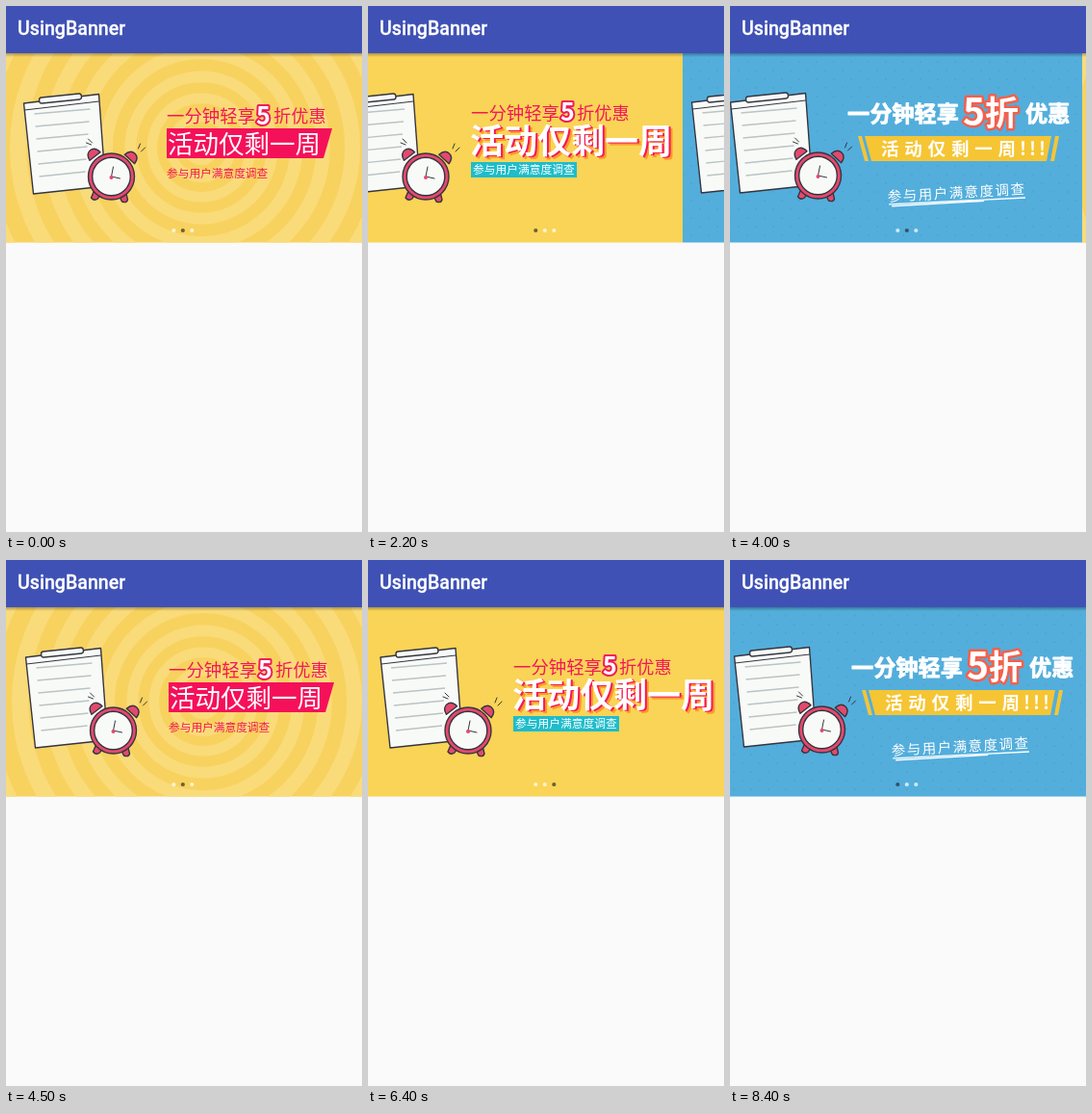
These frames come from a looping animation (370 by 546 pixels, 9.1 s). An HTML page:

```html
<!DOCTYPE html>
<html lang="zh-CN">
<head>
<meta charset="utf-8">
<title>UsingBanner</title>
<style>
  html, body { margin: 0; width: 100%; height: 100%; overflow: hidden; background: #fafafa; }
  svg { display: block; }
  text { font-family: "Noto Sans CJK SC", "Noto Sans CJK", sans-serif; }
  .title { font: 500 19.6px Roboto, sans-serif; fill: #fff; stroke: #fff; stroke-width: .3px; }
  .pink { fill: #f2185a; }
  .white { fill: #fff; }
  .light { font-weight: 300; }
  .medium { font-weight: 500; }
  .bold { font-weight: 700; }
  .black { font-weight: 900; }
  .heavy { stroke: #fff; stroke-width: .8px; stroke-linejoin: round; }
  .outlined { fill: #fff; paint-order: stroke; stroke-linejoin: round; }
  .five { font-weight: 700; font-size: 25px; stroke: #f2185a; stroke-width: 4px; }
  .big { font-weight: 900; stroke: #f4604c; stroke-width: 5px; }
  .ink { stroke: #35353f; stroke-width: 1.4; stroke-linejoin: round; stroke-linecap: round; }
  .thin { fill: none; stroke-width: 1; }
  .red { fill: #e4496d; }
  .paper { fill: #f8faf8; }
</style>
</head>
<body>
<svg width="370" height="546" viewBox="0 0 370 546">
  <defs>
    <clipPath id="page"><rect x="-5" y="49" width="375" height="196.5"/></clipPath>
    <pattern id="specks" width="18" height="18" patternUnits="userSpaceOnUse">
      <circle cx="4" cy="4" r="1" fill="#4ba4d2"/>
      <circle cx="13" cy="13" r="1" fill="#4ba4d2"/>
    </pattern>
    <linearGradient id="shade" x2="0" y2="1">
      <stop stop-opacity=".3"/>
      <stop offset="1" stop-opacity="0"/>
    </linearGradient>
    <g id="art">
      <path class="ink paper" d="M-91-76L-13-85.5L-6 10L-81 18Z"/>
      <path class="ink thin" d="M-90-69L-13-78"/>
      <rect class="ink paper" x="-75" y="-84" width="44" height="6" rx="2.5" transform="rotate(-6 -53 -81)"/>
      <g id="rules" stroke="#bac4c4" stroke-width="1.4"></g>
      <g class="ink red">
        <path d="M-18 15l-3 7q3 4 7 1l3-5Z"/>
        <path d="M8 20l3 6q5 2 6-2l-2-8Z"/>
        <path d="M-7 0q1-8 7-8t7 8Z" transform="translate(-17 -21) rotate(-38)"/>
        <path d="M-7 0q1-8 7-8t7 8Z" transform="translate(19 -18) rotate(42)"/>
        <circle r="24"/>
        <circle class="paper" r="19.8"/>
      </g>
      <path class="ink thin" d="M2-10L0 0L9 2"/>
      <circle class="red" cy="1" r="2"/>
      <path class="ink thin" d="M-26-35l5 2M-24-39l4 4M28-29l2-5M31-26l4-4"/>
    </g>
  </defs>

  <rect width="370" height="546" fill="#fafafa"/>

  <g class="slide" clip-path="url(#page)">
    <rect x="-5" y="49" width="375" height="197" fill="#f8d25f"/>
    <g id="rings" fill="none" stroke="#fadb7a"></g>
    <use href="#art" x="109.5" y="177"/>
    <g class="pink light">
      <text x="167" y="121" font-size="18.4">一分钟轻享</text>
      <text x="278" y="121" font-size="18.2">折优惠</text>
    </g>
    <text class="outlined five" x="260" y="123">5</text>
    <path d="M167 127H339L330 158H167Z" fill="#f5105a"/>
    <text class="white medium" x="168" y="153" font-size="26.5">活动仅剩一周</text>
    <text class="pink" x="167" y="177.5" font-size="11.7">参与用户满意度调查</text>
  </g>

  <g class="slide" clip-path="url(#page)">
    <rect x="-5" y="49" width="375" height="197" fill="#f9d456"/>
    <use href="#art" x="103" y="177"/>
    <g class="pink light">
      <text x="150" y="118" font-size="18.4">一分钟轻享</text>
      <text x="260" y="118" font-size="18.2">折优惠</text>
    </g>
    <text class="outlined five" x="243" y="119">5</text>
    <g class="bold" font-size="35">
      <text x="153" y="155.5" fill="#fb9a2b">活动仅剩一周</text>
      <text x="151" y="154" fill="#f5185a">活动仅剩一周</text>
      <text class="white" x="149" y="152.5">活动仅剩一周</text>
    </g>
    <rect x="150" y="162" width="110" height="16" fill="#1fbccb"/>
    <text class="white" x="152" y="174.3" font-size="11.75">参与用户满意度调查</text>
  </g>

  <g class="slide" clip-path="url(#page)">
    <rect x="-5" y="49" width="375" height="197" fill="#53aedc"/>
    <rect x="-5" y="49" width="375" height="197" fill="url(#specks)"/>
    <use href="#art" x="95.5" y="176"/>
    <g class="white black heavy" font-size="23.2">
      <text x="126" y="120">一分钟轻享</text>
      <text x="311" y="120">优惠</text>
    </g>
    <text class="outlined big" y="124"><tspan x="246" font-size="39">5</tspan><tspan x="269" font-size="35">折</tspan></text>
    <path d="M137 135h4l7 26h-4ZM144 135H338L333 161H151ZM342 135h4l-5 26h-4Z" fill="#f6c534"/>
    <text class="white black" x="161" y="155" font-size="18.5" letter-spacing="5.8">活动仅剩一周</text>
    <text class="white black" x="305" y="155" font-size="19" letter-spacing="3">!!!</text>
    <g transform="translate(168 203) rotate(-3.2)">
      <text class="white light" font-size="14.5" letter-spacing="1.5">参与用户满意度调查</text>
      <path d="M1 3L143 4M4 5L100 5" fill="none" stroke="#fff" stroke-width="1.3"/>
    </g>
  </g>

  <g id="dots"></g>
  <rect y="49" width="370" height="4" fill="url(#shade)"/>
  <rect width="370" height="49" fill="#3f51b5"/>
  <text class="title" x="12" y="30">UsingBanner</text>
</svg>
<script>
  const LOOP = 9100, STEP = 100, PITCH = 375, GLIDE = 732;
  const starts = [311, 2152.5, 3987, 5814.5, 7647.6];
  const slides = [...document.querySelectorAll('.slide')];
  const byId = id => document.getElementById(id);

  function add(parent, tag, attrs) {
    const el = document.createElementNS('http://www.w3.org/2000/svg', tag);
    for (const key in attrs) el.setAttribute(key, attrs[key]);
    return parent.appendChild(el);
  }

  for (let k = 1; k < 10; k++) {
    add(byId('rings'), 'circle', { cx: 203, cy: 147, r: 13 * k + 1.35 * k * k, 'stroke-width': 6.5 + 1.35 * k });
  }
  for (let i = 0; i < 6; i++) {
    add(byId('rules'), 'path', { d: `M${-80 + i} ${-65 + 13 * i}l${58 - 2 * i} -5` });
  }
  const dots = [174.3, 183.8, 193.3].map(cx => add(byId('dots'), 'circle', { cx, cy: 233, r: 2.1 }));

  // Viscous-fluid scroll curve: short soft start, long exponential settle.
  function viscous(p) {
    const x = 8 * p, e = Math.exp(-1);
    return x < 1 ? x - 1 + Math.exp(-x) : e + (1 - e) * (1 - Math.exp(1 - x));
  }
  const ease = p => p >= 1 ? 1 : viscous(p) / viscous(1);

  function draw(now) {
    const t = Math.floor(now % LOOP / STEP) * STEP;
    const moves = starts.filter(s => s <= t).length;
    const done = moves ? ease((t - starts[moves - 1]) / GLIDE) : 1;
    const current = moves % 3, previous = (moves + 2) % 3;
    const shift = Math.round(PITCH * (1 - done));
    slides.forEach((slide, i) => {
      const shown = i === current || (i === previous && shift > 0);
      slide.style.display = shown ? '' : 'none';
      slide.setAttribute('transform', `translate(${i === current ? shift : shift - PITCH} 0)`);
    });
    const active = (current + 1) % 3;
    dots.forEach((dot, i) => dot.setAttribute('fill', i === active ? 'rgba(40,40,40,.68)' : 'rgba(255,255,255,.72)'));
  }

  const begin = performance.now();
  function tick() {
    draw(performance.now() - begin);
    requestAnimationFrame(tick);
  }
  tick();
</script>
</body>
</html>
```
